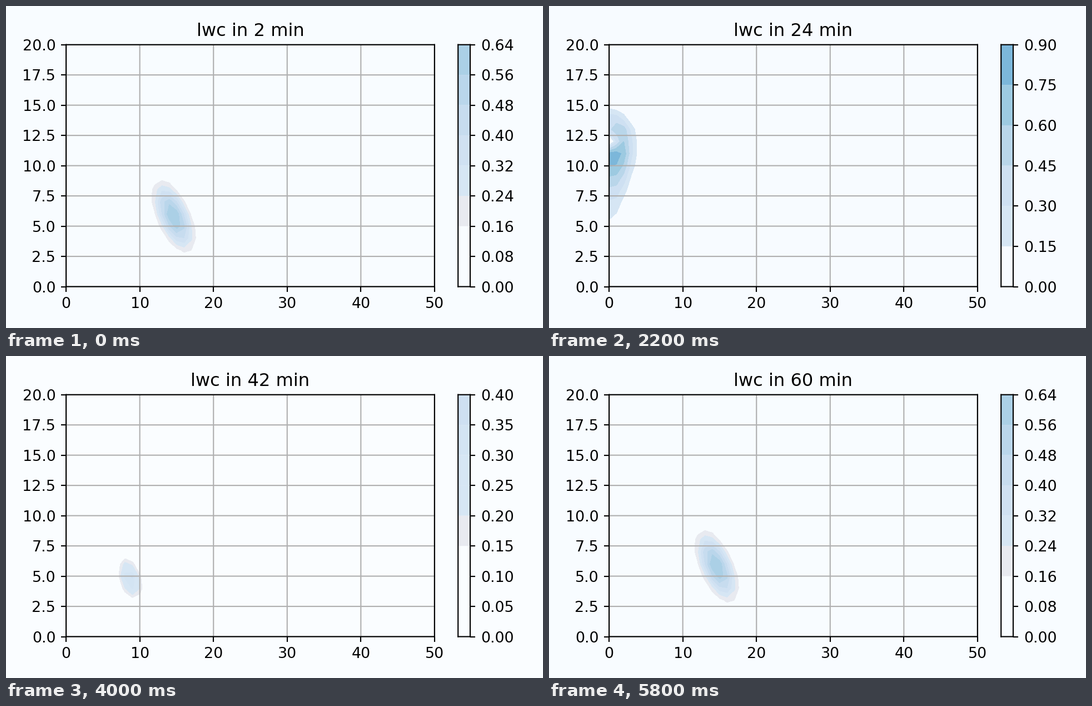
Animation of 966 by 580 pixels, one loop 6 s. Source, as a matplotlib script:

```python
import numpy as np
import matplotlib.pyplot as plt
from matplotlib.animation import FuncAnimation
from matplotlib.ticker import MaxNLocator

W, H, DPI = 966, 580, 200
FRAMES, INTERVAL = 30, 200
SCALE = .966

plt.rcParams.update({"font.family": "DejaVu Sans", "path.snap": False})
for key in ("font.size", "axes.linewidth", "grid.linewidth", "axes.titlepad",
            "xtick.major.size", "xtick.major.width", "xtick.major.pad",
            "ytick.major.size", "ytick.major.width", "ytick.major.pad"):
    plt.rcParams[key] *= SCALE

X, Y = np.meshgrid(np.arange(51.), np.arange(21.))


def slanted(x, y, long, short, peak, edge=.16):
    """Oval bump leaning 45 degrees that falls to edge on its rim."""
    u = (X - x - Y + y) / 2 ** .5 / long
    v = (X - x + Y - y) / 2 ** .5 / short
    return peak * (edge / peak) ** np.hypot(u, v) ** 2.2


def tower(grow, peak):
    """Cloud on the left wall; grow 0 is a low puff, 1 a tall hollow column."""
    def mix(a, b):
        return a + (b - a) * grow

    rise = Y - mix(5.9, 11)
    d = np.where(rise > 0,
                 np.abs(rise / mix(1.55, 3.7)) ** 4,
                 np.abs(rise / mix(2.8, 5.75)) ** 1.4)
    width = mix(1.75, 3.75) * np.maximum(1 - .6 * d, .2)
    body = np.exp(-1.95 * (d + (X / width) ** 3.3))
    hollow = np.exp(-(X / 1.3) ** 2 - ((rise - 1.2) / .75) ** 2)
    return peak * (body - 1.22 * grow * hollow)


def weather(minute):
    """Peak water content and its field at a given minute."""
    if minute < 4:
        minute = 60
    left = np.interp(minute, [6, 8, 10, 18, 20, 28], [0, .17, .6, 1.8, 1.8, 0])
    small = np.interp(minute, [38, 42, 44, 50, 52], [0, .38, .42, .17, 0])
    late = np.interp(minute, [50, 60], [0, .63])
    if left > 0:
        return left, tower(np.clip((minute - 10) / 8, 0, 1), left)
    if small > 0:
        return small, slanted(8.7, 4.8, 1.85, 1.25, .4) * small / .4
    if late > 0:
        return late, slanted(14.6, 5.8, 3.7, 1.9, .66) * late / .63
    return 0, None


def shade(mid):
    return "#e8eaf0" if mid < .21 else plt.cm.Blues(max(mid, .3) / 1.8)


def backdrop(peak):
    ends = zip((252, 253, 255), (248, 252, 255), (244, 248, 253))
    return [np.interp(peak, [.17, .6, 1.8], c) / 255 for c in ends]


def decimals(step):
    return next(d for d in range(1, 5) if abs(round(step, d) - step) < 1e-9)


def box(x0, x1, top=69.7, bottom=505.5):
    return [x0 / W, 1 - bottom / H, (x1 - x0) / W, (bottom - top) / H]


fig = plt.figure(figsize=(W / DPI, H / DPI), dpi=DPI)
back = fig.add_artist(plt.Rectangle((0, 0), 1, 1, transform=fig.transFigure,
                                    lw=0, zorder=-1))
ax = fig.add_axes(box(108.1, 770.9))
bar = fig.add_axes(box(813.2, 835))


def draw_bar(ticks, labels):
    bar.set_ylim(ticks[0], ticks[-1])
    bar.set_xticks([])
    bar.yaxis.tick_right()
    bar.set_yticks(ticks, labels)


def update(i):
    minute = 2 * i + 2
    peak, cloud = weather(minute)
    for a in (ax, bar):
        a.clear()
        a.patch.set_visible(False)
    back.set_color(backdrop(peak))

    if peak:
        levels = MaxNLocator(8, min_n_ticks=1).tick_values(0, peak)
        step = levels[1] - levels[0]
        shown = levels[levels + step / 2 > .17]
        colors = [shade(low + step / 2) for low in shown[:-1]]
        if colors:
            ax.contourf(cloud, shown, colors=colors)
        for low, color in zip(shown, colors):
            bar.axhspan(low, low + step, color=color, lw=0)
        d = decimals(step)
        draw_bar(levels, [f"{v:.{d}f}" for v in levels])
    else:
        draw_bar([-2.5, 0, 2.5], ["\u22122.5", "0.0", "2.5"])
        bar.text(834 / W, 1 - 62 / H, "1e\u221214", ha="right",
                 transform=fig.transFigure)

    ax.set(xlim=(0, 50), ylim=(0, 20), xticks=range(0, 51, 10),
           yticks=np.arange(0, 20.1, 2.5))
    ax.grid(True)
    ax.set_title(f"lwc in {minute} min")
    return []


anim = FuncAnimation(fig, update, frames=FRAMES, interval=INTERVAL,
                     init_func=lambda: update(0), repeat=True, repeat_delay=0)
plt.show()
```
